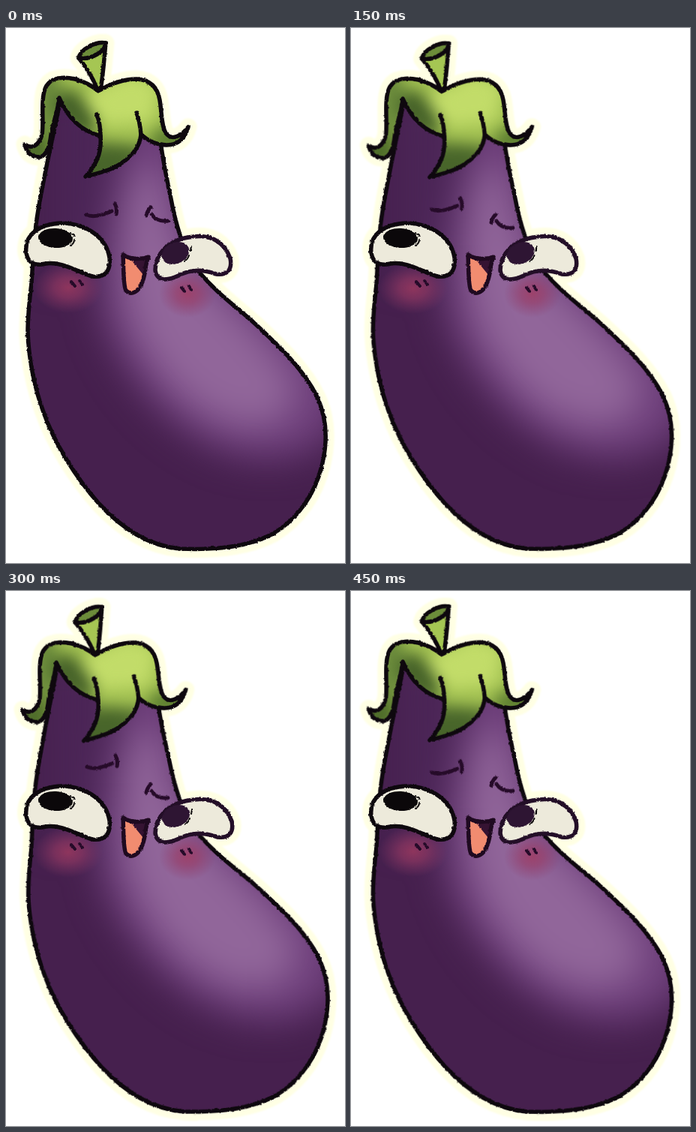
An HTML page that plays this animation: 452x713 px, repeating every 0.6 s.

```html
<!DOCTYPE html>
<html lang="en">
<head>
<meta charset="utf-8">
<title>Aubergine</title>
<style>
html, body { margin: 0; width: 100%; height: 100%; overflow: hidden; background: #fff; }
svg { display: block; width: 452px; height: 713px; }
.sway { transform-origin: 220px 355px; }
.rightEye { transform-origin: 198px 305px; }
.halo { fill: #ffffe4; stroke: #ffffe4; stroke-width: 23; stroke-linejoin: round; stroke-linecap: round; }
.line { fill: none; stroke: #0e080e; stroke-width: 5.5; stroke-linejoin: round; stroke-linecap: round; }
.mark { fill: none; stroke: #260b29; stroke-width: 5; stroke-linecap: round; stroke-linejoin: round; }
.eye { fill: #edeadb; stroke: #0e080e; stroke-width: 5.5; stroke-linejoin: round; }
.rightEye .eye { stroke: #230e27; }
.ink { fill: #0b080a; }
.plum { fill: #2e1533; }
.thin { fill: none; stroke: #0b080a; stroke-width: 2; stroke-linecap: round; }
</style>
</head>
<body>
<svg viewBox="0 0 452 713">
  <defs>
    <path id="body" d="M74 88C62 150 46 215 40 262C37 290 36 310 34 340C31 365 29 385 29 405C30 440 38 480 50 512C64 552 92 598 124 634C156 668 190 690 232 694C275 696 322 692 356 674C390 654 412 620 421 584C429 552 428 520 415 492C398 456 364 424 333 395C303 368 282 354 259 327C237 299 229 270 222 238C216 205 208 180 203 125L160 85Z"/>
    <path id="crown" d="M25 155C34 162 44 157 48 142C51 125 45 92 54 77C61 65 78 65 92 68C106 72 115 77 123 84C140 74 157 68 174 68C192 69 202 79 205 96C208 114 207 130 213 140C221 151 234 144 243 132C239 146 230 156 214 156C199 156 188 149 180 142C178 164 160 178 142 187C130 192 118 195 106 198C119 184 128 168 126 144C100 137 82 120 71 93C69 112 63 124 60 142C58 160 54 170 45 172C33 172 27 165 25 155Z"/>
    <path id="stem" d="M97 40C99 28 121 17 133 20C131 38 130 60 126 82L121 80C115 65 106 51 97 40Z"/>
    <path id="eyeL" d="M27 300C24 275 44 261 75 260C110 261 134 281 138 306C140 326 130 333 115 331C95 325 75 311 53 314C39 317 30 315 27 300Z"/>
    <path id="eyeR" d="M199 323C199 300 218 281 250 278C275 275 292 287 299 307C302 322 295 330 280 328C262 321 245 322 230 330C215 337 201 338 199 323Z"/>
    <path id="mouth" d="M156 302C164 308 178 309 190 305C185 315 187 325 182 338C177 352 167 357 160 350C156 343 157 320 156 302Z"/>
    <clipPath id="bodyClip"><use href="#body"/></clipPath>
    <clipPath id="crownClip"><use href="#crown"/></clipPath>
    <clipPath id="mouthClip"><use href="#mouth"/></clipPath>
    <filter id="rough" filterUnits="userSpaceOnUse" x="-10" y="-10" width="472" height="733" color-interpolation-filters="sRGB">
      <feTurbulence type="fractalNoise" baseFrequency=".28" numOctaves="2" seed="4"/>
      <feDisplacementMap in="SourceGraphic" scale="2.8" xChannelSelector="R" yChannelSelector="G"/>
    </filter>
    <filter id="glow" filterUnits="userSpaceOnUse" x="-20" y="-20" width="492" height="753"><feGaussianBlur stdDeviation="1"/></filter>
    <filter id="soft" filterUnits="userSpaceOnUse" x="-100" y="-60" width="700" height="860" color-interpolation-filters="sRGB"><feGaussianBlur stdDeviation="24"/></filter>
    <filter id="mist" filterUnits="userSpaceOnUse" x="-60" y="-60" width="560" height="800" color-interpolation-filters="sRGB"><feGaussianBlur stdDeviation="10"/></filter>
    <radialGradient id="blush">
      <stop offset="0" stop-color="#a03a60" stop-opacity=".8"/>
      <stop offset=".4" stop-color="#983a64" stop-opacity=".6"/>
      <stop offset="1" stop-color="#8c3968" stop-opacity="0"/>
    </radialGradient>
  </defs>

  <g filter="url(#glow)">
    <g class="halo sway"><use href="#body"/><use href="#crown"/><use href="#stem"/></g>
    <use class="halo" href="#eyeL"/>
    <g class="rightEye"><use class="halo" href="#eyeR"/></g>
  </g>

  <g class="sway">
    <g clip-path="url(#bodyClip)">
      <use href="#body" fill="#46204e"/>
      <g filter="url(#soft)">
        <path fill="#4b2556" d="M60 80H240V330H60Z"/>
        <path fill="#6e3f7b" d="M165 90C155 200 122 290 125 375C150 470 240 565 335 575C400 578 430 555 450 520V430L300 320L255 260L225 90Z"/>
        <path fill="#91669a" d="M174 185C154 250 148 340 168 390C192 450 240 518 320 532C380 530 398 500 378 460C340 405 285 355 245 315C222 270 212 220 205 185Z"/>
      </g>
      <ellipse cx="83" cy="346" rx="46" ry="34" fill="url(#blush)"/>
      <ellipse cx="242" cy="354" rx="38" ry="32" fill="url(#blush)"/>
    </g>
    <use class="line" href="#body" filter="url(#rough)"/>

    <g clip-path="url(#crownClip)">
      <use href="#crown" fill="#a3c252"/>
      <g filter="url(#mist)">
        <path fill="#c2dc69" d="M112 85L165 62L205 75L195 125L135 130L108 105Z"/>
        <path fill="#446028" d="M66 85L92 82L118 118L118 148L95 140L62 110Z"/>
        <path fill="#67873a" d="M40 60L72 60L66 145H40Z"/>
        <path fill="#48652a" d="M90 162L128 152L190 158L150 215L90 215Z"/>
        <path fill="#5c7d30" d="M195 138L250 120V165H190Z"/>
        <path fill="#4c6a29" d="M15 150L62 140L60 185H15Z"/>
      </g>
    </g>
    <use href="#stem" fill="#a5c653"/>
    <path fill="#6c8c3a" d="M97 40C98 27 121 16 133 20C133 31 113 43 97 40Z"/>
    <g filter="url(#rough)">
      <use class="line" href="#crown"/>
      <path class="line" d="M126 144C126 132 124 123 121 115M180 142C179 130 177 121 174 113"/>
      <use class="line" href="#stem"/>
      <path class="line" d="M97 40C113 43 133 31 133 20"/>
    </g>
  </g>

  <g filter="url(#rough)">
    <path class="mark" d="M87 338L92 344M98 337L102 342M234 346L238 351M244 344L247 349" style="stroke-width:4"/>
    <use href="#mouth" fill="#351332"/>
    <path fill="#f18c70" clip-path="url(#mouthClip)" d="M154 300C166 305 174 319 185 331L180 362H152Z"/>
    <use class="line" href="#mouth" style="stroke:#1f0a20"/>
    <g class="browL"><path class="mark" d="M107 249C117 253 131 249 141 244M145 234C148 239 148 243 147 248"/></g>
    <g class="browR"><path class="mark" d="M193 239C190 242 188 245 187 250M194 248C199 256 207 258 216 257"/></g>
    <use class="eye" href="#eyeL"/>
    <ellipse class="ink" cx="66" cy="280" rx="23" ry="13" transform="rotate(3 66 280)"/>
    <path class="thin" d="M86 273L92 277M86 290Q91 287 91 282"/>
    <g class="rightEye">
      <use class="eye" href="#eyeR"/>
      <ellipse class="plum" cx="226" cy="300" rx="19" ry="14" transform="rotate(-24 226 300)"/>
      <path class="thin" d="M247 291L246 297M238 311Q243 307 244 303"/>
    </g>
  </g>
</svg>
<script>
const steps = [0, 1, 2, 1];
const poses = {
  sway: n => `rotate(${-0.43 * n}deg)`,
  rightEye: n => `scaleX(${1 + 0.01 * n})`,
  browL: n => `translate(${0.5 * n}px, ${-7.3 * n}px)`,
  browR: n => `translate(0px, ${9.3 * n}px)`
};

for (const [name, pose] of Object.entries(poses)) {
  const frames = [...steps, steps[0]].map((n, i) => ({
    transform: pose(n), offset: i / steps.length, easing: 'steps(1, end)'
  }));
  for (const el of document.querySelectorAll('.' + name)) {
    el.animate(frames, { duration: 600, iterations: Infinity }).startTime = 0;
  }
}
</script>
</body>
</html>
```
